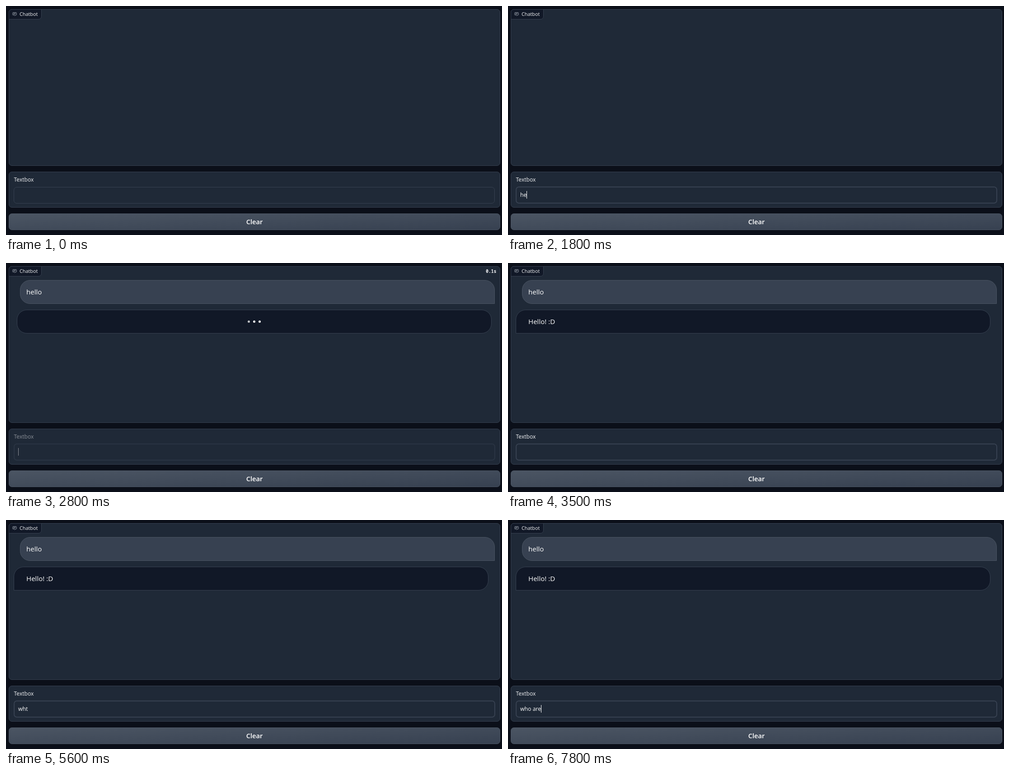
These frames come from a looping animation (1098x510 px, 8 s). An HTML page:

```html
<!DOCTYPE html>
<html lang="en">
<head>
<meta charset="utf-8">
<title>Chatbot</title>
<style>
  html, body { margin: 0; width: 100%; height: 100%; overflow: hidden; background: #0b0f19; }
  #stage { position: relative; width: 1098px; height: 510px; overflow: hidden;
    background: #0b0f19; color: #f3f4f6; font-family: "Open Sans", "Noto Sans", sans-serif; }
  #stage div, #stage svg { position: absolute; box-sizing: border-box; white-space: pre; }
  .panel { left: 6px; width: 1088px; background: #1f2937; border: 1px solid #374151; border-radius: 7px; }
  #chat { top: 7px; height: 349px; }
  #form { top: 369px; height: 80px; }
  #tag { left: 6px; top: 7px; width: 73px; height: 23px; background: #111827;
    border: 1px solid #374151; border-radius: 7px 0 7px 0; }
  #tagText { left: 30px; top: 10px; font-size: 10.85px; line-height: 15px; }
  #timer { right: 12.5px; top: 12px; font: 600 9.7px/13px "Noto Sans Mono", monospace; }
  .bubble { width: 1051px; height: 53px; border: 1px solid; border-radius: 22px; }
  #user { left: 31px; top: 38px; background: #374151; border-color: #4b5563; border-bottom-right-radius: 0; }
  #reply, #wait { top: 104px; background: #111827; border-color: #374151; }
  #reply { left: 17px; border-bottom-left-radius: 0; }
  #wait { left: 24px; }
  .msg { left: 45px; font-size: 15.1px; line-height: 20px; color: #fff; }
  .dot { top: 128px; width: 5px; height: 5px; border-radius: 50%; background: #fff; }
  #label { left: 17.5px; top: 378px; font-size: 12.1px; line-height: 17px; }
  #input { left: 17px; top: 403px; width: 1065px; height: 37px; border: 1px solid #374151; border-radius: 7px; }
  #input.focus { top: 402px; width: 1066px; height: 38px; border-width: 2px; }
  #typed { left: 27px; top: 412px; height: 17px; font-size: 12.26px; line-height: 17px; color: #fff; }
  #caret { left: 100%; top: 0; width: 1px; height: 17px; background: #fff; }
  #clear { left: 6px; top: 462px; width: 1088px; height: 37px; border: 1px solid #4b5563; border-radius: 7px;
    background: linear-gradient(to bottom right, #4b5563, #374151); }
  #clearText { left: 6px; top: 470px; width: 1088px; text-align: center; color: #fff;
    font-size: 14.7px; font-weight: 600; line-height: 20px; }
</style>
</head>
<body>
<div id="stage">
  <div id="chat" class="panel"></div>
  <div id="tag"></div>
  <svg style="left:14px;top:13px" width="10" height="10" viewBox="0 0 32 32" fill="none" stroke="#b4bac4" stroke-width="2.6">
    <path d="M15 23H6a3 3 0 0 1-3-3V8a3 3 0 0 1 3-3h20a3 3 0 0 1 3 3v12a3 3 0 0 1-3 3h-5.500l-4 6.500M8 11h16M8 17h10"/>
  </svg>
  <div id="tagText">Chatbot</div>
  <div id="sent">
    <div id="user" class="bubble"></div>
    <div class="msg" style="top:54px">hello</div>
  </div>
  <div id="pending">
    <div id="wait" class="bubble"></div>
    <div class="dot" style="left:535px"></div>
    <div class="dot" style="left:547px"></div>
    <div class="dot" style="left:559px"></div>
  </div>
  <div id="answer">
    <div id="reply" class="bubble"></div>
    <div class="msg" style="top:120px">Hello! :D</div>
  </div>
  <div id="timer"></div>
  <div id="form" class="panel"></div>
  <div id="field">
    <div id="label">Textbox</div>
    <div id="input"></div>
    <div id="typed"><span id="text"></span><div id="caret"></div></div>
  </div>
  <div id="clear"></div>
  <div id="clearText">Clear</div>
</div>
<script>
const LOOP = 8000, FOCUS = 900, SEND = 2800, REPLY = 3200;

// [time, typed text, caret visible]
const steps = [
  [0, "", 0], [FOCUS, "", 1], [1400, "", 0],
  [1700, "h", 1], [1800, "he", 1], [2100, "hel", 1], [2300, "hell", 1], [2500, "hello", 1],
  [SEND, "", 1], [3500, "", 0],
  [3800, "w", 1], [3900, "wa", 1], [4300, "wa", 0], [4500, "w", 0],
  [4800, "wh", 1], [5000, "wht", 1], [5100, "whta", 1],
  [5600, "wht", 0], [5800, "wh", 0], [5900, "w", 0], [6100, "w", 1], [6500, "w", 0],
  [6700, "who", 1], [6900, "who ", 1], [7300, "who a", 1], [7600, "who ar", 1], [7800, "who are", 1]
];

const $ = id => document.getElementById(id);
const show = (id, on) => { $(id).style.display = on ? "" : "none"; };
const dots = document.querySelectorAll(".dot");

// Each dot waits its turn at full strength, then pulses once a second.
function dotOpacity(age) {
  if (age < 0) return 1;
  const phase = age / 1000 % 1;
  return 0.65 + 0.15 * Math.cos(2 * Math.PI * phase);
}

function draw(t) {
  const [, text, caret] = steps.findLast(s => s[0] <= t);
  const waiting = t >= SEND && t < REPLY;
  $("text").textContent = text;
  show("caret", caret);
  show("sent", t >= SEND);
  show("pending", waiting);
  show("answer", t >= REPLY);
  show("timer", waiting);
  $("input").classList.toggle("focus", t >= FOCUS);
  $("field").style.opacity = waiting ? 0.5 : 1;
  if (waiting) {
    const age = t - SEND + 100;
    $("timer").textContent = (age / 1000).toFixed(1) + "s";
    dots.forEach((dot, i) => { dot.style.opacity = dotOpacity(age + 50 - i * 330); });
  }
}

const start = performance.now();
let last = -1;
function tick() {
  const t = Math.floor((performance.now() - start) % LOOP / 100) * 100;
  if (t !== last) draw(last = t);
  requestAnimationFrame(tick);
}
tick();
</script>
</body>
</html>
```
